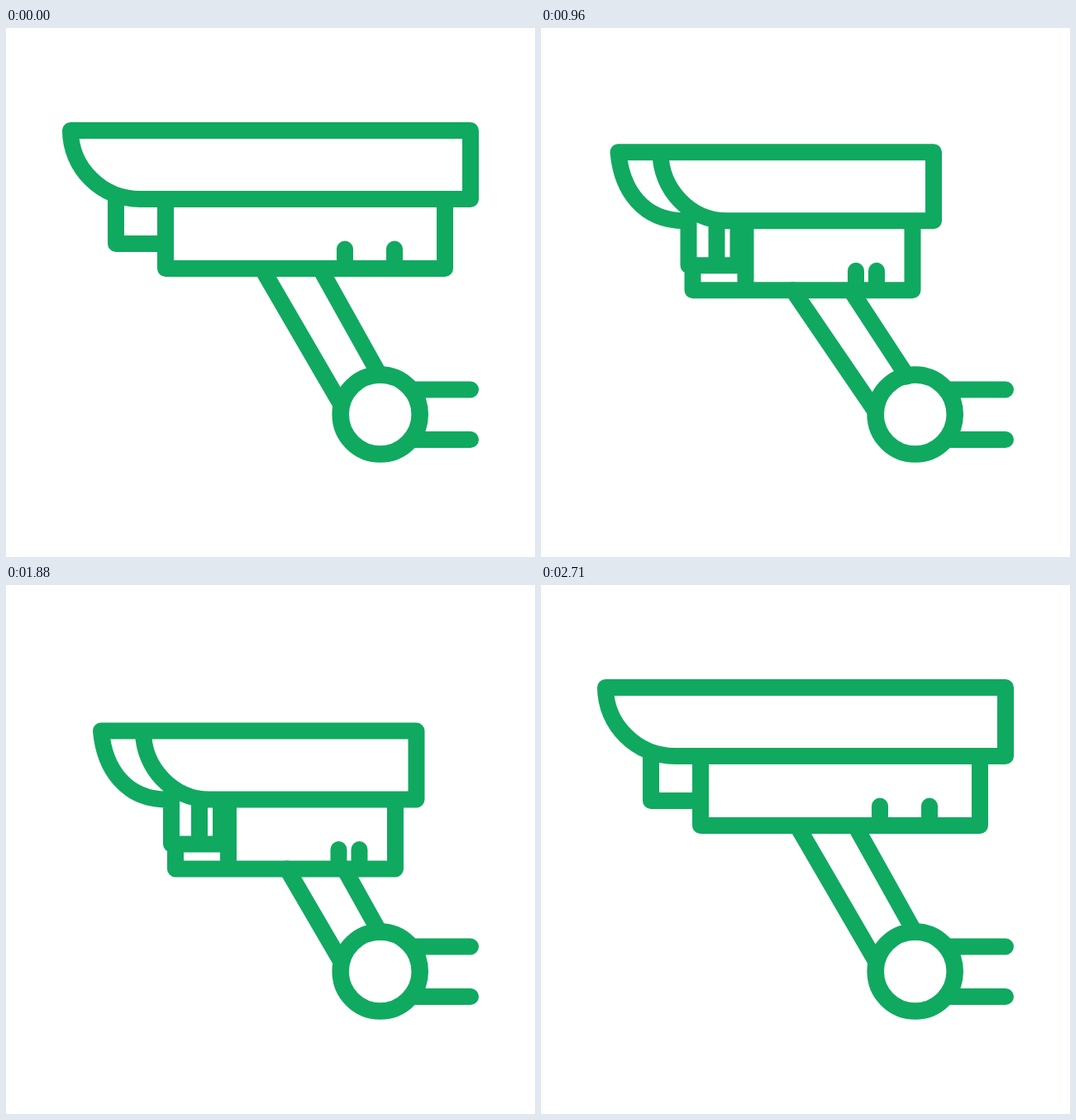
An HTML page that plays this animation: 640 px wide and 640 px high, repeating every 3 s.

```html
<!DOCTYPE html>
<html lang="en">
<head>
<meta charset="utf-8">
<title>Security camera</title>
<style>
  html, body { margin: 0; width: 100%; height: 100%; overflow: hidden; background: #fff; }
  svg { display: block; width: 100%; height: 100%; }
</style>
</head>
<body>
<svg viewBox="0 0 640 640" fill="none" stroke="#10a960" stroke-width="20" stroke-linecap="round" stroke-linejoin="round">
  <path d="M490 437.5H562M490 498H562"/>
  <path id="arm"/>
  <circle cx="452.7" cy="467.5" r="48" stroke-width="20.6"/>
  <path id="head"/>
</svg>
<script>
const LOOP = 3000, FPS = 24;
const arm = document.getElementById('arm');
const head = document.getElementById('head');

// Camera outline: turn 0 is the side view, 1 is turned towards the viewer.
function headPath(turn) {
  const x = (side, turned) => side + (turned - side) * turn;
  const front = x(193, 261), edge = x(193, 197), right = x(531, 463);
  const lens = x(133, 192), rim = x(133, 226);
  const hood = x(78, 107), hoodEnd = x(562, 488.5);
  const post = px => `M${px} 207V261`;
  const slot = px => `M${px} 267.5V291`;
  return [
    `M${hood} 124H${hoodEnd}V207H${x(162, 238)}`,
    `C${x(115.6, 194)} 207 ${x(78, 158)} 169 ${x(78, 158)} 124`,
    `M${hood} 124C${x(78, 111)} ${x(169, 170)} ${x(115.6, 137)} 207 ${x(162, 187)} 207`,
    `M${lens} 207V261H${x(193, 252)}`,
    post(rim), post(x(193, 226)), post(x(193, 252)),
    `M${edge} 261V291H${right}V207M${front} 207V291`,
    slot(x(410, 394.5)), slot(x(470, 419.5))
  ].join('');
}

function draw(frame) {
  const ease = (from, to) => {
    const t = Math.min(1, Math.max(0, (frame - from) / (to - from)));
    return t * t * (3 - 2 * t);
  };
  const turn = ease(0, 11), lower = ease(19, 27), shift = ease(36, 45), back = ease(55, 65);
  const dx = -27 * lower + 35 * shift - 8 * back;
  const dy = 52.5 * (lower - back);
  const bend = lower - shift;
  const left = 309.7 - 10 * lower + 40.3 * shift - 30.3 * back;
  const right = 380 - 10.5 * lower + 39.8 * shift - 29.3 * back;

  head.setAttribute('d', headPath(turn - back));
  head.setAttribute('transform', `translate(${dx} ${dy})`);
  arm.setAttribute('d',
    `M${left} ${291 + dy}L${405 - bend} ${455 + 17 * bend}` +
    `M${right} ${291 + dy}L${452 - 18 * bend} ${420 + 3 * bend}`);
}

const start = performance.now();
function tick() {
  const time = (performance.now() - start) % LOOP;
  // The motion runs in steps of 1/24 s, rounded to 10 ms.
  draw(Math.floor((time + 5) * FPS / 1000) % 72);
  requestAnimationFrame(tick);
}
tick();
</script>
</body>
</html>
```
